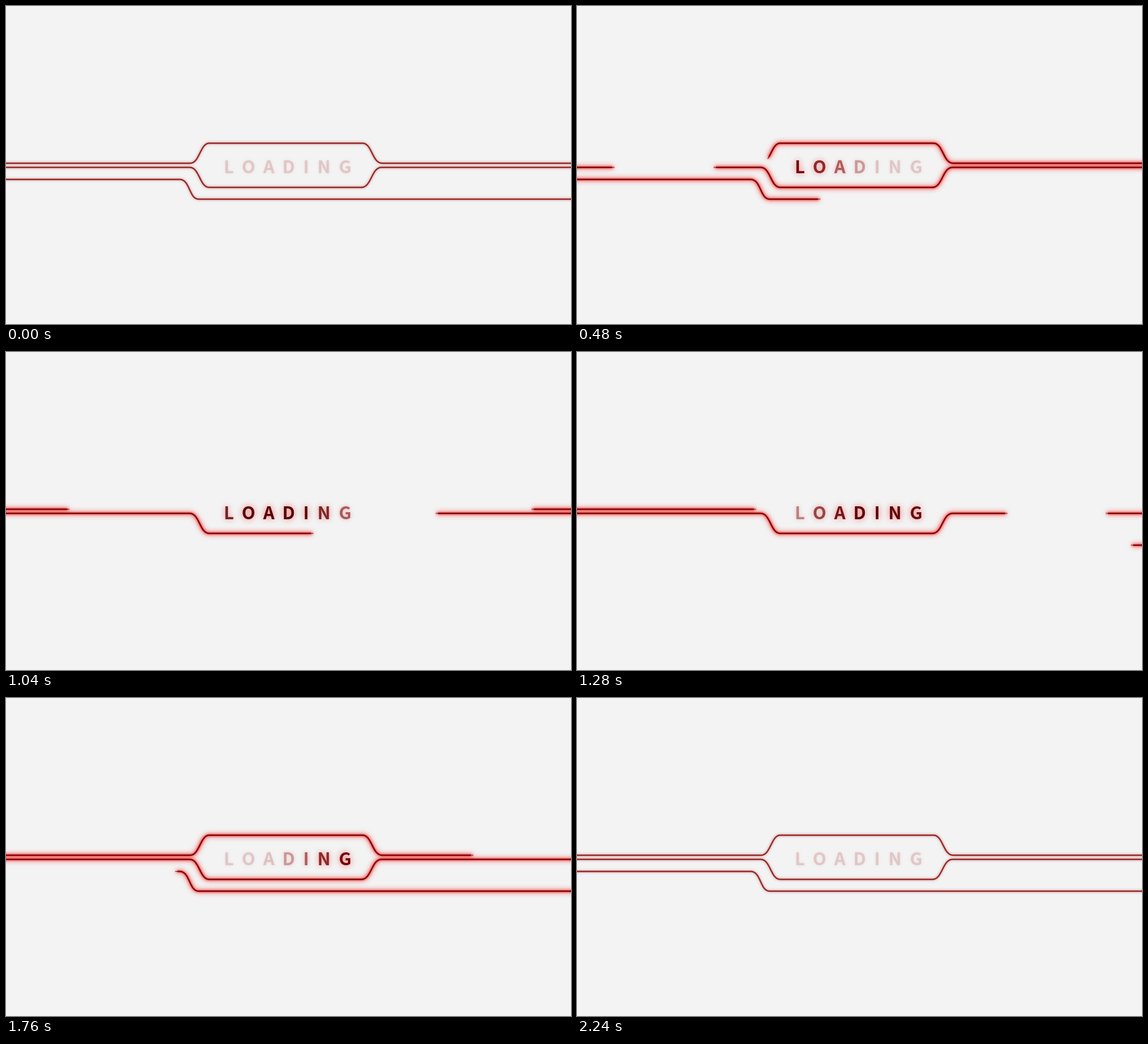
Recreate the animation shown at these times as an HTML page with a canvas. Size 960x540 px, loop 2400 ms.

```html
<!DOCTYPE html>
<html lang="en">
<head>
<meta charset="utf-8">
<title>Loading</title>
<style>
html, body { margin: 0; width: 100%; height: 100%; overflow: hidden; background: #f3f3f3; }
canvas { display: block; }
</style>
</head>
<body>
<canvas id="stage" width="960" height="540"></canvas>
<script>
const ctx = document.getElementById('stage').getContext('2d');
const LOOP = 2400, STEP = 40, END = 2240;
const PAD = 20;     // each line runs this far past both stage edges
const FAR = 2000;   // offset used to draw a shadow without its shape

// A gap opens at the start of each line (head) and closes behind it (tail):
// [start ms, end ms, easing x1, easing x2]
const lines = [
  {
    d: 'M-20 267H313C329 267 330 233 345 233H606C622 233 622 267 639 267H980',
    head: [10, 1235], tail: [713, 2038, 0.42, 0.753]
  },
  {
    d: 'M-20 274H312C329 274 329 308 345 308H604C621 308 621 274 638 274H980',
    head: [10, 1508], tail: [249, 1746]
  },
  {
    d: 'M980 328H327C311 328 313 294.5 295 294.5H-20',
    head: [16, 876], tail: [1209, 2069]
  }
];
for (const line of lines) {
  const el = document.createElementNS('http://www.w3.org/2000/svg', 'path');
  el.setAttribute('d', line.d);
  line.path = new Path2D(line.d);
  line.total = el.getTotalLength();
}

const letters = [...'LOADING'];
const centers = [379.5, 412, 446.5, 480.5, 510, 540, 576];
const FONT = '700 30px "Noto Sans CJK JP", "Noto Sans CJK SC", "Noto Sans CJK", "Open Sans", sans-serif';

const clamp = v => Math.max(0, Math.min(1, v));
const mix = (a, b, k) => a + (b - a) * k;
const smooth = v => { v = clamp(v); return v * v * (3 - 2 * v); };
const rgba = (r, g, b, a) => `rgba(${Math.round(r)},${Math.round(g)},${Math.round(b)},${a})`;

function ease(t, [from, to, x1 = 1 / 3, x2 = 2 / 3]) {
  const x = clamp((t - from) / (to - from));
  let lo = 0, hi = 1;
  for (let i = 0; i < 24; i++) {
    const u = (lo + hi) / 2, v = 1 - u;
    if (3 * x1 * u * v * v + 3 * x2 * u * u * v + u * u * u < x) lo = u; else hi = u;
  }
  return smooth((lo + hi) / 2);
}

function segments(line, t) {
  const run = line.total - 2 * PAD;
  const head = ease(t, line.head) * run, tail = ease(t, line.tail) * run;
  if (head < 0.01 || tail > run - 0.01) return [[0, line.total]];
  const list = [];
  if (tail > 0.5) list.push([0, PAD + tail]);
  if (head < run - 0.5) list.push([PAD + head, line.total]);
  return list;
}

function strokePart(line, [a, b], width, inset) {
  const from = a > 0 ? a + inset : 0;
  const to = b < line.total ? b - inset : b;
  if (to <= from) return;
  ctx.lineWidth = width;
  ctx.setLineDash([0, from, to - from, line.total + 50]);
  ctx.stroke(line.path);
}

function glow(color, blur, draw) {
  ctx.save();
  ctx.shadowColor = color;
  ctx.shadowBlur = blur;
  ctx.shadowOffsetY = FAR;
  ctx.translate(0, -FAR);
  ctx.strokeStyle = ctx.fillStyle = '#000';
  draw();
  ctx.restore();
}

function drawLines(t) {
  const lit = Math.min(clamp(t / 440), clamp((END - t) / 440));
  const parts = lines.flatMap(line => segments(line, t).map(seg => [line, seg]));
  for (const [line, seg] of parts) {
    const shape = () => strokePart(line, seg, 2.6, 2);
    if (lit > 0) glow(rgba(245, 0, 0, 0.95 * lit), 10, shape);
    glow(rgba(mix(150, 225, lit), mix(50, 0, lit), mix(40, 0, lit), mix(0.5, 0.95, lit)), 4, shape);
  }
  ctx.strokeStyle = rgba(mix(154, 136, lit), mix(40, 0, lit), mix(40, 0, lit), 1);
  for (const [line, seg] of parts) {
    strokePart(line, seg, 1.2, 0);
    strokePart(line, seg, 2.4, 4);
  }
}

function drawText(t) {
  const edge = Math.min(smooth(t / 240), smooth((END - t) / 240));
  const deep = 1 - smooth(Math.abs(t - END / 2) / 400);
  ctx.font = FONT;
  ctx.textBaseline = 'alphabetic';
  letters.forEach((ch, i) => {
    const away = Math.abs(t - (700 + 140 * i));
    const k = edge * (1 - smooth((away - 140) / 710));
    const box = ctx.measureText(ch);
    const x = centers[i] - (box.actualBoundingBoxRight - box.actualBoundingBoxLeft) / 2;
    const shape = () => ctx.fillText(ch, x, 283.5);
    glow(rgba(mix(190, 235, k), mix(90, 0, k), mix(90, 0, k), mix(0.12, 0.6, k)), mix(5, 11, k), shape);
    ctx.fillStyle = rgba(mix(139, mix(112, 82, deep), k), 0, 0, mix(0.14, 1, k));
    shape();
  });
}

function frame(now) {
  const t = Math.min(END, Math.floor((now % LOOP) / STEP) * STEP);
  ctx.fillStyle = '#f3f3f3';
  ctx.fillRect(0, 0, 960, 540);
  drawLines(t);
  drawText(t);
}

let start;
function tick(now) {
  start ??= now;
  frame(now - start);
  requestAnimationFrame(tick);
}
frame(0);
requestAnimationFrame(tick);
</script>
</body>
</html>
```
